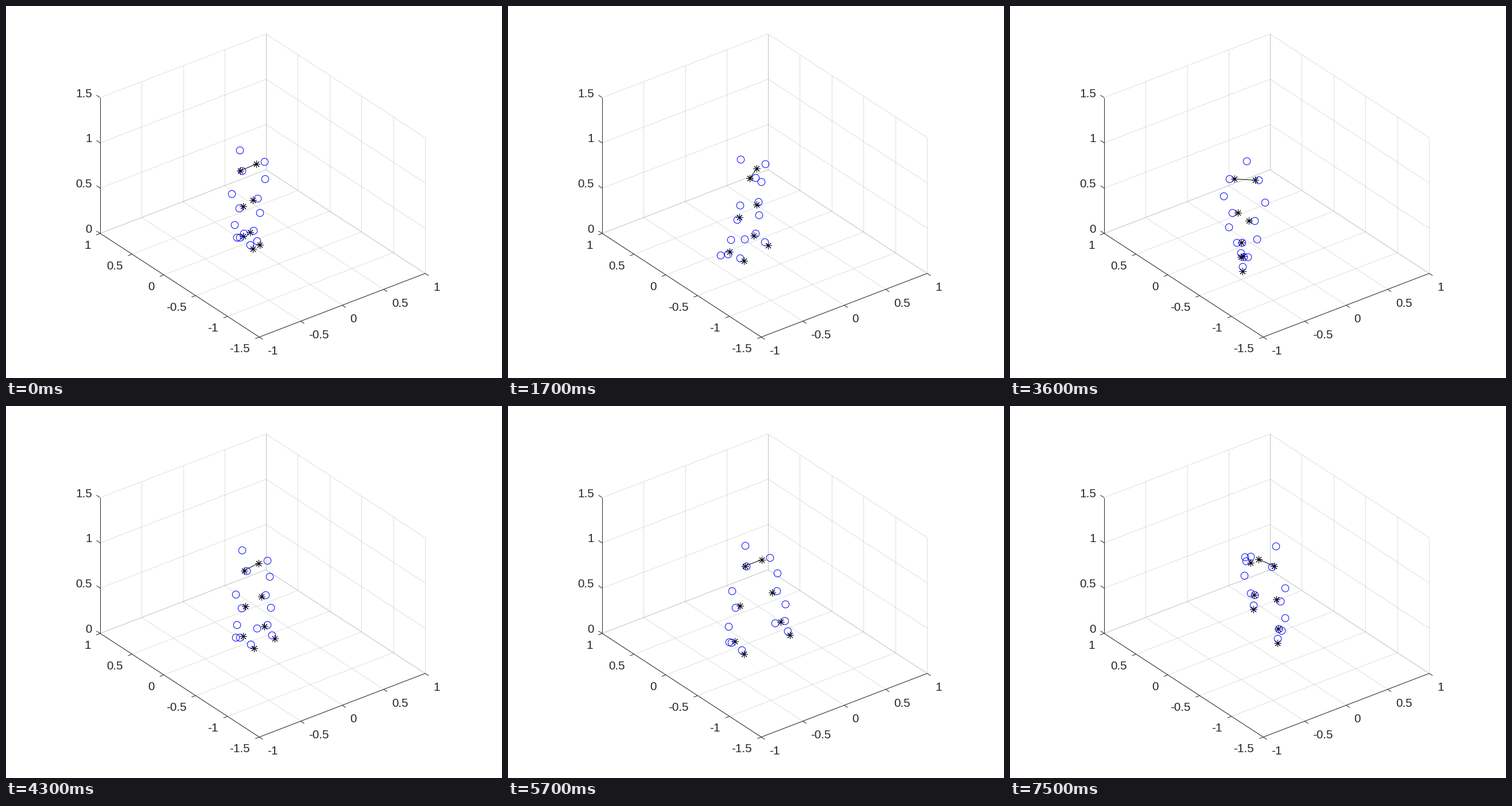
These frames come from a looping animation (864x648 px, 7.6 s). A matplotlib script:

```python
import numpy as np
import matplotlib.pyplot as plt
from matplotlib.animation import FuncAnimation

W, H, DPI, FRAMES = 864, 648, 100, 76
PT = 72 / DPI
DARK = "#262626"
UP = np.array([0, 0, 1.0])
HIP_Z, ANKLE_Z, HIP_HALF = 0.8, 0.08, 0.1
THIGH, SHANK = 0.383, 0.339
plt.rcParams["font.family"] = "Liberation Sans"

# Pelvis: time, x, y, heading in degrees.
PELVIS = [(0, 0.05, 0.04, 2), (17, 0, -0.07, 33), (27, -0.09, -0.065, -34),
          (36, -0.15, -0.10, -44), (41, 0.08, 0.03, 8), (51, 0.08, 0.03, 8),
          (56, 0.13, 0.10, 0), (63, 0.04, -0.06, -10), (75, 0.21, 0.03, -80)]
# Footfalls: time, x, y, height.
RIGHT = [(0, -0.03, 0.02, 0), (5, -0.36, -0.12, 0), (17, -0.33, -0.13, 0),
         (25, -0.15, -0.05, 0), (36, -0.15, -0.05, 0), (41, -0.03, 0.02, 0),
         (51, -0.03, 0.02, 0), (58, -0.20, -0.035, 0), (71, -0.20, -0.035, 0),
         (75, -0.07, -0.14, 0.54)]
LEFT = [(0, 0.07, 0.04, 0), (9, 0.40, -0.02, 0), (17, 0.04, -0.03, 0),
        (22, 0.38, -0.07, 0), (27, 0.20, -0.23, 0.12), (32, 0.33, -0.13, 0),
        (36, -0.30, -0.27, 0), (41, 0.24, 0.04, 0), (51, 0.24, 0.04, 0),
        (58, 0.39, -0.01, 0), (63, 0.37, -0.02, 0), (68, 0.41, -0.02, 0),
        (75, 0.29, -0.05, 0)]


def project(p):
    """Orthographic view from azimuth -37.5 and elevation 30 degrees."""
    az, el = np.radians([-37.5, 30])
    x, y, z = np.asarray(p, float).T - np.array([[0, -0.25, 0.75]]).T.reshape(
        (3,) + (1,) * (np.ndim(p) - 1))
    right = x * np.cos(az) + y * np.sin(az)
    up = (y * np.cos(az) - x * np.sin(az)) * np.sin(el) + z * np.cos(el)
    return np.stack([447.1 + 182.1 * right, 312.7 - 182.1 * up], axis=-1)


def segment_at(keys, t):
    """Values before and after time t, and the progress between them."""
    keys = np.array(keys, float)
    i = min(np.searchsorted(keys[:, 0], t, side="right") - 1, len(keys) - 2)
    a, b = keys[i], keys[i + 1]
    return a[1:], b[1:], (t - a[0]) / (b[0] - a[0])


def ease(a, b, u):
    return a + (b - a) * u * u * (3 - 2 * u)


def heading(deg):
    """Left and forward unit vectors."""
    c, s = np.cos(np.radians(deg)), np.sin(np.radians(deg))
    return np.array([c, s, 0]), np.array([s, -c, 0])


def ankle_at(falls, t):
    a, b, u = segment_at(falls, t)
    p = ease(a, b, u)
    p[2] += ANKLE_Z + 0.06 * np.sin(np.pi * u) * min(1, np.hypot(*(b - a)[:2]) / 0.2)
    return p


def knee_between(hip, ankle, pole):
    """Two-bone solution, bending the knee towards the pole."""
    line = ankle - hip
    dist = np.linalg.norm(line)
    line /= dist
    along = (THIGH**2 - SHANK**2 + dist**2) / (2 * dist)
    pole = pole - line * (pole @ line)
    bend = np.sqrt(max(0, THIGH**2 - along**2))
    return hip + line * along + pole / np.linalg.norm(pole) * bend


def leg(hip, falls, side, yaw, t):
    """Skin markers and joint centres of one leg."""
    ankle = ankle_at(falls, t)
    left, fwd = heading(yaw)
    out = side * left
    knee = knee_between(hip, ankle, fwd + 16 * (ankle[2] - ANKLE_Z) ** 2 * UP)
    toe_dir = heading(max(yaw, -40))[1]
    skin = [hip + 0.53 * (knee - hip) + 0.125 * out,
            knee + 0.055 * out,
            knee + 0.5 * (ankle - knee) + 0.105 * out,
            ankle + 0.045 * out,
            ankle - 0.095 * toe_dir - 0.056 * UP,
            ankle + 0.105 * toe_dir - 0.05 * UP]
    return skin, [knee, ankle, ankle + 0.144 * toe_dir - 0.076 * UP]


def pose(t):
    """Screen places of skin markers and joint centres; the hips come first."""
    x, y, yaw = ease(*segment_at(PELVIS, t))
    left, fwd = heading(yaw)
    mid = np.array([x, y, HIP_Z])
    hips = [mid - HIP_HALF * left, mid + HIP_HALF * left]
    rings = [mid - 0.131 * fwd + 0.13 * UP]
    stars = list(hips)
    for hip, falls, side in zip(hips, (RIGHT, LEFT), (-1, 1)):
        skin, joints = leg(hip, falls, side, yaw, t)
        rings += [mid + 0.14 * side * left + 0.072 * fwd + 0.043 * UP] + skin
        stars += joints
    return project(rings), project(stars)


fig = plt.figure(figsize=(W / DPI, H / DPI), dpi=DPI, facecolor="white")
ax = fig.add_axes([0, 0, 1, 1])
ax.set_xlim(0, W)
ax.set_ylim(H, 0)
ax.axis("off")


def line(a, b, **style):
    ax.plot(*np.transpose([a, b]), color=DARK, lw=PT,
            solid_capstyle="butt", **style)


def grid(a, b):
    line(project(a), project(b), alpha=0.15, zorder=1)


def tick(point, value, ends, text, ha):
    p = project(point)
    line(p, p + ends, zorder=2)
    ax.text(*(p + text), f"{value:g}", ha=ha, va="baseline",
            fontsize=20.8 * PT, color=DARK)


for x in np.arange(-1, 1.1, 0.5):
    grid((x, -1.5, 0), (x, 1, 0))
    grid((x, 1, 0), (x, 1, 1.5))
    tick((x, -1.5, 0), x, (6, 4), (14, 30), "left")
for y in np.arange(-1.5, 1.1, 0.5):
    grid((-1, y, 0), (1, y, 0))
    grid((1, y, 0), (1, y, 1.5))
    tick((-1, y, 0), y, (-7, 2.7), (-16, 26.7), "right")
for z in np.arange(0, 1.6, 0.5):
    grid((-1, 1, z), (1, 1, z))
    grid((1, -1.5, z), (1, 1, z))
    tick((-1, 1, z), z, (-6.5, -4.2), (-14, -1), "right")

front, corner = (-1, -1.5, 0), (-1, 1, 0)
for a, b in ((front, corner), (front, (1, -1.5, 0)), (corner, (-1, 1, 1.5))):
    line(project(a), project(b), zorder=2)

hip_line, = ax.plot([], [], color="black", lw=PT, zorder=3)
star_marks, = ax.plot([], [], ls="", marker=(8, 2, 0), ms=12.5 * PT,
                      mec="black", mew=PT, zorder=4)
ring_marks, = ax.plot([], [], ls="", marker="o", ms=12.5 * PT, mfc="none",
                      mec="blue", mew=PT, zorder=5)


def update(frame):
    rings, stars = pose(frame)
    ring_marks.set_data(*rings.T)
    star_marks.set_data(*stars.T)
    hip_line.set_data(*stars[:2].T)
    return ring_marks, star_marks, hip_line


anim = FuncAnimation(fig, update, frames=FRAMES, interval=100, repeat=True,
                     repeat_delay=0, blit=False)
plt.show()
```
